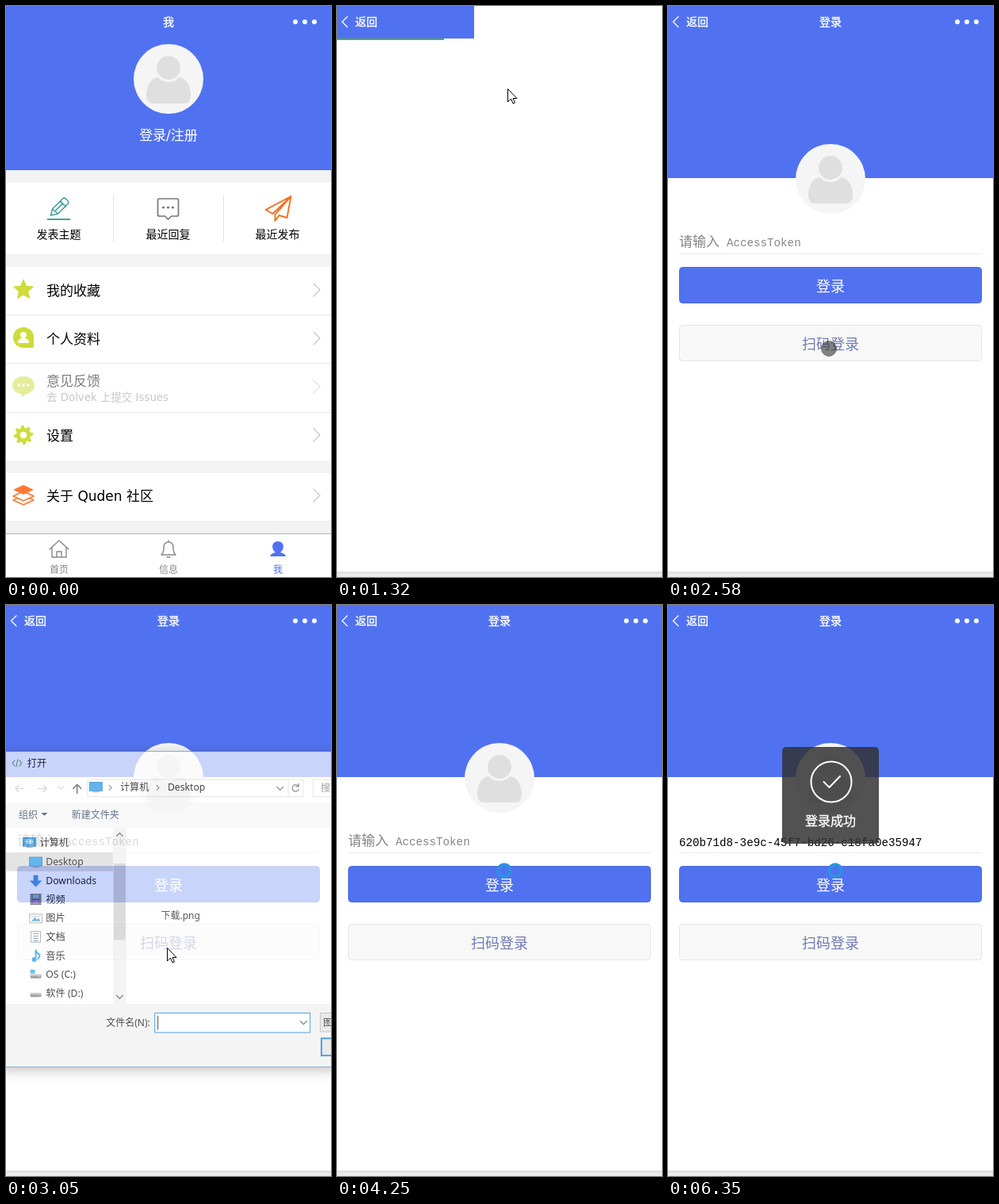
An HTML page that plays this animation: 410 px wide and 720 px high, repeating every 8000 ms.

```html
<!DOCTYPE html>
<html lang="zh-CN">
<head>
<meta charset="utf-8">
<title>登录</title>
<style>
html, body { margin: 0; width: 100%; height: 100%; overflow: hidden; background: #fff; }
svg { display: block; width: 410px; height: 720px; font-family: "DejaVu Sans", "Noto Sans CJK SC", "Noto Sans CJK JP", sans-serif; }
.line { fill: none; stroke-linecap: round; stroke-linejoin: round; }
.mono { font-family: "Liberation Mono", monospace; }
.thin { font-weight: 300; }
.strong { stroke: #fff; stroke-width: .35px; }
.win { font-family: "Noto Sans", "Noto Sans CJK SC", "Noto Sans CJK JP", sans-serif; }
.shadow { filter: drop-shadow(0 4px 8px rgba(0, 0, 0, .35)); }
</style>
</head>
<body>
<svg id="stage" viewBox="0 0 410 720"></svg>
<script>
const BLUE = '#5172f0', LIME = '#cddc39', ORANGE = '#ff7733';

// Markup helpers
const rect = (x, y, w, h, fill, more = '') =>
  `<rect x="${x}" y="${y}" width="${w}" height="${h}" fill="${fill}" ${more}/>`;
const circle = (x, y, r, fill, more = '') => `<circle cx="${x}" cy="${y}" r="${r}" fill="${fill}" ${more}/>`;
const path = (d, fill, more = '') => `<path d="${d}" fill="${fill}" ${more}/>`;
const line = (d, color, w = 1, more = '') =>
  `<path class="line" d="${d}" stroke="${color}" stroke-width="${w}" ${more}/>`;
const text = (x, y, size, str, fill = '#000', more = '') =>
  `<text x="${x}" y="${y}" font-size="${size}" fill="${fill}" ${more}>${str}</text>`;
const group = (id, body, more = '') => `<g id="${id}" ${more}>${body}</g>`;
const at = (x, y, body) => `<g transform="translate(${x} ${y})">${body}</g>`;
const MID = 'text-anchor="middle"';

const polar = (n, radius) => 'M' + Array.from({ length: n }, (_, i) => {
  const a = i / n * 2 * Math.PI - Math.PI / 2, r = radius(i);
  return (r * Math.cos(a)).toFixed(1) + ' ' + (r * Math.sin(a)).toFixed(1);
}).join('L') + 'Z';

const avatar = (x, y) => at(x, y,
  circle(0, 0, 44, '#f5f5f5') +
  path('M-28 21C-28 8-22-2-12-2H12C22-2 28 8 28 21Q28 31 19 31H-19Q-28 31-28 21Z', '#dfdfdf') +
  circle(0, -14, 16.5, '#dfdfdf', 'stroke="#f5f5f5" stroke-width="3"'));
const dots = [365, 377, 389].map(x => circle(x, 20, 3, '#fff')).join('');

// Profile page
const shortcuts = [
  [66.5, '发表主题', line('M-14 14H14', '#45a0a0', 1.8) +
    line('M-10 9L-8 1 5-12Q7-14 10-11T12-6L-1 7ZM2-9L9-2M-8 1L-1 7M5-6L-4 3', '#45a0a0', 1.6)],
  [204.5, '最近回复', line('M-11-12H11Q13-12 13-10V8Q13 10 11 10H4L0 14-4 10H-11Q-13 10-13 8V-10Q-13-12-11-12Z', '#777', 1.7) +
    [-6, 0, 6].map(x => circle(x, -1, 1.6, '#777')).join('')],
  [342.5, '最近发布', line('M17-15L-15 2-6 7 17-15 12 12 2 9M17-15L-3 8V16L2 9', '#f37021', 1.9)],
].map(([x, label, icon]) => at(x, 255, icon) + text(x, 293, 14, label, '#000', MID)).join('');

const person = path('M-7 6Q-7 1-2 0Q-4-2-4-5Q-4-8 0-8T4-5Q4-2 2 0Q7 1 7 6Z', '#fff');
const layer = y => `M0 ${y - 6}L13 ${y} 0 ${y + 6} -13 ${y}Z`;
const rows = [
  [358, '我的收藏', path(polar(10, i => i % 2 ? 6 : 13), LIME, `stroke="${LIME}" stroke-linejoin="round"`)],
  [419, '个人资料', path('M0-14A13 13 0 1 0 0 12H11Q13 12 13 10V-1A13 13 0 0 0 0-14Z', LIME) + person],
  [480, '', path('M0-13C18-13 18 8 3 9L-1 13-3 9C-18 8-18-13 0-13Z', LIME) +
    [-6, 0, 6].map(x => circle(x, -2, 1.7, '#fff')).join('')],
  [541, '设置', path(polar(32, i => (i + 1) % 4 < 2 ? 12.3 : 9), LIME) + circle(0, 0, 4.3, '#fff')],
  [617, '关于 Quden 社区', line(layer(6), ORANGE, 1.6) +
    path(layer(1), '#fff') + line(layer(1), ORANGE, 1.6) + path(layer(-7), ORANGE)],
].map(([y, label, icon]) => {
  const body = at(22, y, icon) + line(`M388 ${y - 8}L396 ${y} 388 ${y + 8}`, '#c8c8c8', 1.3);
  return label ? body + text(51, y + 6.5, 17, label)
    : `<g opacity=".5">${body + text(51, 478.5, 17, '意见反馈') + text(51, 498, 13.4, '去 Dolvek 上提交 Issues', '#8f8f94')}</g>`;
}).join('');

const tabs = [
  [67, '首页', '#888', line('M-12 0L0-11 12 0M-9-2V10H9V-2M-3 10V3H3V10', '#888', 1.4)],
  [205, '信息', '#888', line('M-9 7Q-6 4-6-2Q-6-9 0-9T6-2Q6 4 9 7ZM0-9V-11M-2 10H2', '#888', 1.4)],
  [343, '我', BLUE, path('M-10 9Q-9 5-3 4Q-7 1-7-4Q-6-10 0-10T7-4Q7 1 3 4Q9 5 10 9Z', BLUE)],
].map(([x, label, color, icon]) => at(x, 685, icon) + text(x, 715, 12, label, color, MID)).join('');

const profile = rect(0, 0, 410, 720, '#f3f3f3') + rect(0, 0, 410, 207, BLUE) +
  text(205, 25, 14, '我', '#fff', MID + ' class="strong"') + dots + avatar(205, 92) +
  text(205, 169, 17, '登录/注册', '#fff', MID) +
  [[223, 90], [329, 244], [589, 60]].map(([y, h]) => rect(0, y, 410, h, '#fff')).join('') +
  line('M135.5 239V297M274.5 239V297', '#e6e6e6') + shortcuts +
  line('M0 389.5H410M0 450.5H410M0 512.5H410', '#e5e5e5') + rows +
  rect(0, 665, 410, 55, '#fff') + rect(0, 665, 410, 1, '#b0b2b0') + tabs;

// Sign-in page
const form = rect(0, 41, 410, 176, BLUE) + avatar(205, 218) +
  group('hint', text(14, 303, 17, '请输入', '#858585', 'class="thin"') +
    text(74, 303, 14.2, 'AccessToken', '#858585', 'class="mono"')) +
  text(14, 304, 14.2, '620b71d8-3e9c-45f7-bd26-c18fa0e35947', '#000', 'id="token" class="mono"') +
  rect(14, 312, 382, 1, '#ebebeb') +
  rect(14.5, 329.5, 381, 45, BLUE, 'rx="4" stroke="#4868dc"') +
  text(205, 359.5, 18, '登录', '#fff', MID + ' class="thin"') +
  rect(14.5, 402.5, 381, 45, '#f8f8f8', 'id="scan" rx="4" stroke="#e4e4e4"') +
  text(205, 432.5, 18, '扫码登录', '#6f7bb4', MID + ' class="thin"');

const signIn = rect(0, 0, 410, 720, '#ececec') + rect(0, 713, 410, 3, '#e2e2e2') + rect(0, 0, 410, 713, '#fff') +
  group('form', form) + rect(0, 0, 410, 41, BLUE, 'id="header"') +
  group('back', line('M13 13.5L6.5 20 13 26.5', '#fff', 1.2) + text(23, 25, 14, '返回', '#fff', 'class="strong"')) +
  group('title', text(205, 25, 14, '登录', '#fff', MID + ' class="strong"') + dots) +
  rect(0, 41, 0, 2, '#4caf50', 'id="bar"');

// File dialog
const monitor = rect(-8, -6, 16, 11, '#1c97ea', 'stroke="#1673b5"') + rect(-4, 6, 8, 1, '#789');
const disk = rect(-7, 0, 14, 5, '#777', 'rx="1"') + rect(-7, 0, 14, 2, '#bbb') + circle(4, 3, .8, '#6f6');
const page = rect(-6, -7, 12, 14, '#fff', 'stroke="#8a9aa5"');
const tree = [
  ['Desktop', monitor],
  ['Downloads', path('M-3-7H3V0H8L0 8-8 0H-3Z', '#3b87d9')],
  ['视频', rect(-7, -7, 14, 14, '#444') + rect(-4, -6, 8, 5, '#7ab') + rect(-4, 1, 8, 5, '#96c') +
    line('M-5.5-5V6M5.5-5V6', '#ddd', 1, 'stroke-dasharray="1 2"')],
  ['图片', rect(-8, -5, 16, 11, '#fff', 'stroke="#999"') + path('M-6 4L-1-1 2 2 4 0 6 4Z', '#4a9bc7') + rect(-6, -3, 12, 2, '#bde')],
  ['文档', page + line('M-3-4H3M-3-1H3M-3 2H3M-3 5H3', '#5c8ba8')],
  ['音乐', line('M0 4V-7Q1-3 5-1Q5 2 3 4', '#1c97ea', 2) + circle(-2, 5, 3, '#1c97ea')],
  ['OS (C:)', disk + rect(-7, -6, 6, 5, '#28a8ea')],
  ['软件 (D:)', disk],
].map(([label, icon], i) => {
  const y = 323 + 24 * i;
  return at(34, y, icon) + text(47, y + 4.5, 12.4, label);
}).join('');
const chevron = (x, y, s = 1, color = '#555') =>
  line(`M${x - 4} ${y - 2 * s}L${x} ${y + 2 * s} ${x + 4} ${y - 2 * s}`, color, 1.3);

const dialog = rect(-10, 181, 430, 405, '#5d86ad', 'class="shadow"') + rect(-10, 182, 430, 403, '#fff') +
  line('M7 193L4 196.5 7 200M13 193L16 196.5 13 200M11 192L9 201', '#6a9a6a', 1.2) + text(23, 201, 12.4, '打开') +
  line('M19 229H8M12 225L8 229 12 233M37 229H48M44 225L48 229 44 233', '#ccc', 1.5) + chevron(66, 228, .7, '#ccc') +
  line('M87 235V224M82 229L87 224 92 229', '#555', 1.7) +
  rect(100.5, 217.5, 276, 22, '#fff', 'stroke="#d9d9d9"') + line('M357.5 218V239', '#d9d9d9') + at(111, 227, monitor) +
  line('M128 225L131 228 128 231M189 225L192 228 189 231', '#666', 1.2) +
  text(142, 232, 12.4, '计算机') + text(203, 232, 12.4, 'Desktop') + chevron(347, 229) +
  line('M370 225.5A4.3 4.3 0 1 0 371 230M371 223V226.5H367.5', '#666', 1.3) +
  rect(389.5, 217.5, 40, 22, '#fff', 'stroke="#d9d9d9"') + text(399, 233, 12.4, '搜索', '#777') +
  rect(-10, 247, 430, 32, '#f5f6f7') + text(12, 267, 12.2, '组织', '#1e395b') + path('M41 260H49L45 264Z', '#1e395b') +
  text(80, 267, 12.2, '新建文件夹', '#1e395b') +
  rect(-10, 311, 143, 24, '#d9d9d9') + at(26, 298, monitor + rect(-5, -4, 10, 6, '#8cccf5')) + text(39, 303, 12.4, '计算机') + tree +
  rect(133, 279, 17, 226, '#f0f0f0') + rect(134, 325, 15, 98, '#cdcdcd') + chevron(141.5, 288, -1) + chevron(141.5, 496) +
  rect(168, 285, 105, 118, '#e5f3ff', 'id="pick"') + text(219.5, 396, 12.2, '下载.png', '#111', MID) +
  rect(-10, 505, 430, 80, '#f0f0f0') + text(124, 533, 12.2, '文件名(N):') +
  rect(186.5, 516.5, 199, 25, '#fff', 'stroke="#0078d7"') + rect(190, 520, 1, 18, '#000', 'id="caret"') +
  text(191, 533, 12.2, '下载.png', '#000', 'id="file"') + chevron(377, 529) +
  rect(398.5, 516.5, 40, 24, '#e1e1e1', 'stroke="#adadad"') + text(402, 533, 12.2, '图片') +
  rect(400, 549, 40, 22, '#e1e1e1', 'stroke="#0078d7" stroke-width="2"');

const toast = rect(144, 179, 122, 122, '#323232', 'rx="5" opacity=".84"') +
  circle(206, 223, 25.5, 'none', 'stroke="#fff" stroke-width="2"') + line('M196.5 223L203.5 230 217 216', '#fff', 2) +
  text(205, 278, 16, '登录成功', '#fff', MID + ' class="strong"');

const pointer = circle(0, 0, 9.5, '#333', 'id="touch" stroke="#222"') +
  path('M.5 .5V17L4.5 13 7 19 9.5 18 7 12.5H12Z', '#fff', 'id="arrow" stroke="#000"') +
  circle(0, 0, 7.8, 'none', 'id="ring" stroke="#2a93e0" stroke-width="4"');

document.getElementById('stage').innerHTML = group('profile', profile) + group('signIn', signIn) +
  group('dialog', dialog, 'class="win"') + group('toast', toast) + group('pointer', pointer);

// Motion
const LOOP = 8000, TICK = 75;
const moves = [
  [225, 326, 672], [825, 216, 91], [975, 215, 104], [1725, 215, 104], [2475, 203, 432],
  [3300, 203, 432], [3450, 210, 363], [3600, 211, 335], [LOOP, 211, 335],
];
const $ = id => document.getElementById(id);
const set = (id, name, value) => $(id).setAttribute(name, value);
const show = (id, on) => set(id, 'opacity', +on);

// n equal steps, the first at a and the last at b
const step = (t, a, b, n) => t < a ? 0 : Math.min(1, (Math.floor((t - a) / (b - a) * (n - 1)) + 1) / n);

function position(t) {
  const q = Math.max(moves[0][0], Math.floor(t / TICK) * TICK);
  const i = moves.findIndex(m => m[0] > q);
  const [a, x, y] = moves[i - 1], [b, x2, y2] = moves[i];
  const p = (q - a) / (b - a), e = p * p * (3 - 2 * p);
  return [x + (x2 - x) * e, y + (y2 - y) * e];
}

function draw(t) {
  show('profile', t < 1250);
  show('signIn', t >= 1250);
  set('header', 'width', t < 1320 ? 0 : t < 1400 ? 173 : 410);
  show('back', t >= 1320);
  show('title', t >= 1400);
  set('bar', 'width', t >= 1720 ? 0 : 50 + 85 * Math.min(4, Math.floor((t - 1245) / 75)));
  set('form', 'opacity', step(t, 1720, 1800, 2));
  set('scan', 'fill', t >= 2740 && t < 2810 ? '#e9e9e9' : '#f8f8f8');

  const open = 1 - (1 - step(t, 2970, 3210, 4)) ** 1.7;
  const seen = open * (1 - step(t, 3840, 4250, 6));
  set('dialog', 'opacity', seen);
  set('dialog', 'transform', `translate(265 383) scale(${.95 + .05 * seen}) translate(-265 -383)`);
  show('pick', t >= 3380);
  set('pick', 'fill', t < 3530 ? '#e5f3ff' : '#cce8ff');
  show('caret', t < 3600);
  show('file', t >= 3600);

  const done = t >= 6250;
  show('hint', !done);
  show('token', done);
  set('toast', 'opacity', step(t, 6250, 6350, 2));

  const arrow = t >= 1250 && t < 1720 || t >= 2810 && t < 3840;
  set('pointer', 'transform', `translate(${position(t).join(' ')})`);
  show('pointer', t >= 230);
  show('arrow', arrow);
  show('ring', t >= 3840);
  const pressed = t >= 1000 && t < 1250 || t >= 2580 && t < 2740;
  set('touch', 'opacity', arrow || t >= 3840 ? 0 : pressed ? .6 : .4);
}

const start = performance.now();
(function frame() {
  draw(Math.max(0, performance.now() - start) % LOOP);
  requestAnimationFrame(frame);
})();
</script>
</body>
</html>
```
